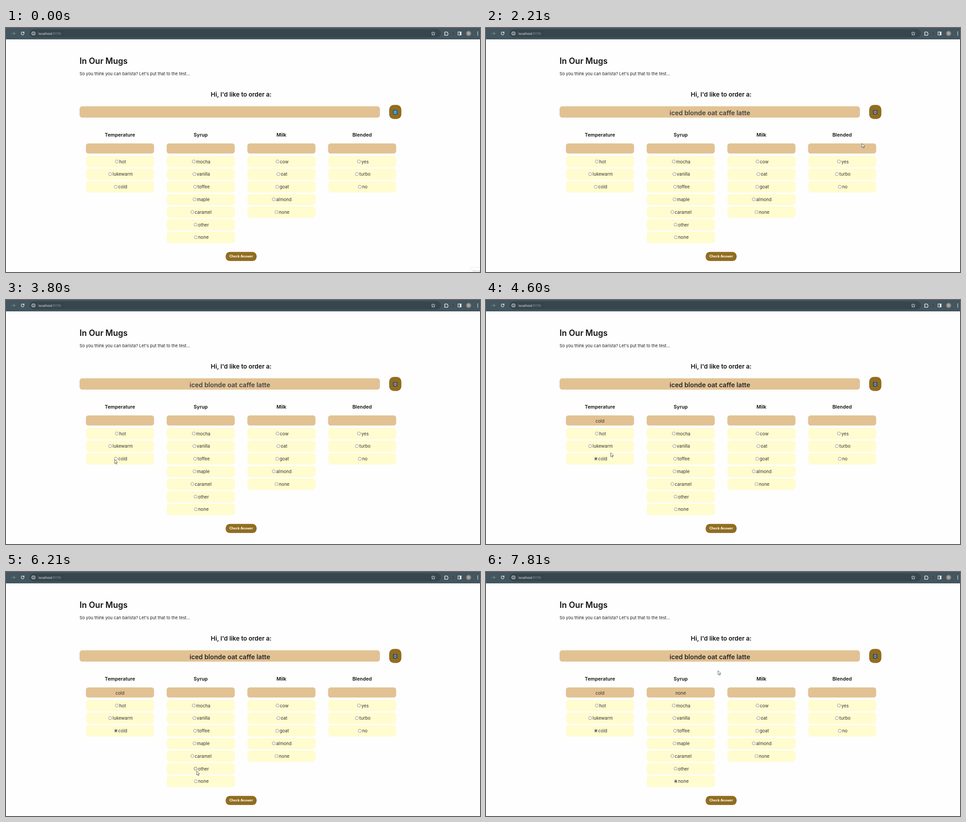
An HTML page for the animation above (8000 ms loop, 1044x537 px).

```html
<!DOCTYPE html>
<html lang="en">
<head>
<meta charset="utf-8">
<title>Barista quiz</title>
<style>
  html, body { margin: 0; width: 100%; height: 100%; overflow: hidden; background: #fefefe; }
  svg { display: block; width: 1044px; height: 537px; font-family: Inter, sans-serif; }
  .mid { text-anchor: middle; }
  .head { font-weight: 600; fill: #111; }
  .label { font-size: 9.75px; fill: #333; }
  .icon { fill: none; stroke: #e4e9eb; stroke-width: 1.2; }
  .ring { fill: #fff; stroke: #777; stroke-width: .8; }
</style>
</head>
<body>
<svg id="stage" viewBox="0 0 1044 537" xmlns="http://www.w3.org/2000/svg">
  <rect width="1044" height="25" fill="#43555e"/>
  <rect x="52" y="2.5" width="906" height="18.5" rx="9.2" fill="#37464d"/>
  <path class="icon" d="M13 12h7M17 9l3 3-3 3" style="stroke:#93a0a6;stroke-width:1"/>
  <path class="icon" d="M39.3 10a3.2 3.2 0 1 0 .6 2.4M39.8 8v2.6h-2.6"/>
  <g class="icon">
    <circle cx="60.5" cy="12" r="3.5"/><path d="M60.5 11.5v2.5M60.5 9.7v1"/>
    <path d="M941 8l1.2 2.7 2.9.3-2.2 2 .7 2.9-2.6-1.6-2.6 1.6.7-2.9-2.2-2 2.9-.3z" style="stroke-width:.9"/>
    <path d="M966 9.3h2a1.3 1.3 0 0 1 2.6 0h2.1v2.2a1.3 1.3 0 0 1 0 2.6v2.1H966v-2a1.4 1.4 0 0 0 0-2.8z"/>
    <path d="M995.7 8.7h6.8v6.8h-6.8z"/>
  </g>
  <path d="M999.5 8.7h3v6.8h-3zM1038 8h2v1.8h-2zM1038 11.2h2v1.8h-2zM1038 14.4h2v1.8h-2z" fill="#e4e9eb"/>
  <path d="M984.5 8v8" stroke="#2f3d44"/>
  <circle cx="1019" cy="12" r="5.5" fill="#8f8c87"/>
  <text class="mid" x="1019" y="14.3" font-size="6" fill="#e8e6e2">B</text>
  <text x="71.3" y="14.5" font-size="7.3" fill="#f1f4f5" style="font-family:'Open Sans',sans-serif">localhost<tspan fill="#a7b1b6">:5173</tspan></text>

  <text class="head" x="162" y="78.5" font-size="18">In Our Mugs</text>
  <text x="162" y="104.4" font-size="9.27" fill="#222">So you think you can barista? Let's put that to the test...</text>
  <text class="mid head" x="518" y="150.7" font-size="13.55">Hi, I'd like to order a:</text>
  <rect x="162" y="172.3" width="661.7" height="25" rx="6" fill="#e2c293"/>
  <text id="order" class="mid" x="493" y="192.4" font-size="14.2" font-weight="600">iced blonde oat caffe latte</text>
  <rect x="844" y="169.3" width="26.8" height="30.9" rx="10" fill="#916d21"/>
  <rect id="refresh" x="852.8" y="181" width="8.8" height="8.8" rx=".8" stroke="#2c4452" stroke-width=".8"/>
  <path d="M855 185.2a2.2 2.2 0 0 1 4-1.2v-1.2M859.5 185.6a2.2 2.2 0 0 1-4 1.2v1.2" fill="none" stroke="#fff" stroke-width="1"/>

  <g id="columns"></g>
  <rect x="483.8" y="492.8" width="68.2" height="20" rx="9" fill="#916d21"/>
  <text class="mid" x="517.9" y="505.4" font-size="7.3" font-weight="700" fill="#fff">Check Answer</text>
  <g id="hint">
    <path d="M1023.5 537v-10H1044" fill="none" stroke="#ececec"/>
    <text x="1027" y="537" font-size="6.5" fill="#c4c4c4">Secur</text>
  </g>
  <path id="cursor" d="M0 0v9l2.1-1.9 1.4 3.2 1.5-.7-1.4-3.1h2.7z" fill="#fff" stroke="#3c4148" stroke-width=".8" stroke-linejoin="round"/>
</svg>
<script>
const LOOP = 8000, STEP = 200;
const ORDERED = 1800, COLD = 4000, NONE = 6800;
const byId = id => document.getElementById(id);

// Each option carries the x of its radio button.
const columns = [
  ["Temperature", "cold", { hot: 244, lukewarm: 229.5, cold: 242 }],
  ["Syrup", "none", { mocha: 413.5, vanilla: 414.8, toffee: 416.5, maple: 415.2, caramel: 410.5, other: 417.5, none: 418 }],
  ["Milk", "", { cow: 598, oat: 599.8, goat: 597.3, almond: 589.8, none: 595.8 }],
  ["Blended", "", { yes: 777.5, turbo: 773, no: 779.3 }]
];

// time, x, y of the pointer tip
const path = [
  [400, 1030, 532], [600, 938, 490], [800, 893, 422], [1000, 805, 315],
  [1200, 754, 262], [1600, 858, 187], [2000, 858, 187], [2200, 828, 254],
  [2600, 640, 310], [3000, 330, 350], [3400, 240, 351], [4400, 238, 351],
  [5400, 421, 275], [5800, 423, 350], [6200, 420, 438], [6600, 417, 459],
  [7000, 417, 459], [7400, 462, 345], [7800, 511, 217]
];

function add(tag, attrs, text = "") {
  const node = document.createElementNS("http://www.w3.org/2000/svg", tag);
  for (const key in attrs) node.setAttribute(key, attrs[key]);
  node.textContent = text;
  return byId("columns").appendChild(node);
}

const picks = {};
let otherRing;
columns.forEach(([title, pick, options], col) => {
  const left = 176 + col * 177.8, mid = left + 75;
  add("text", { class: "mid head", x: mid, y: 239.1, "font-size": 10.8 }, title);
  add("rect", { x: left, y: 254, width: 150, height: 22.3, rx: 5.5, fill: "#e2c293" });
  Object.entries(options).forEach(([name, x], row) => {
    const y = 294 + row * 27.8;
    add("rect", { x: left + .2, y: y - 12.5, width: 150, height: 25, rx: 7, fill: "#fffccf" });
    const ring = add("circle", { class: "ring", cx: x, cy: y - .2, r: 3.4 });
    add("text", { class: "label", x: x + 5.3, y: y + 3.6 }, name);
    if (name === "other") otherRing = ring;
    if (name === pick) picks[title] = [
      add("circle", { cx: x, cy: y - .2, r: 2.1, fill: "#454b55" }),
      add("text", { class: "label mid", x: mid, y: 269.8 }, pick)
    ];
  });
});

const show = (node, on) => { node.style.visibility = on ? "visible" : "hidden"; };

function pointerAt(t) {
  const next = path.findIndex(p => p[0] >= t);
  if (next <= 0) return path[0].slice(1);
  const [t0, x0, y0] = path[next - 1], [t1, x1, y1] = path[next];
  const k = (t - t0) / (t1 - t0);
  return [x0 + (x1 - x0) * k, y0 + (y1 - y0) * k];
}

function draw(now) {
  const t = Math.min(Math.floor((now % LOOP + 10) / STEP) * STEP, LOOP - STEP);
  show(byId("hint"), t < 200);
  show(byId("cursor"), t >= 400);
  byId("cursor").setAttribute("transform", `translate(${pointerAt(t)})`);
  show(byId("order"), t >= ORDERED);
  byId("order").style.fill = t < COLD ? "#434343" : "#252525";
  byId("refresh").style.fill = t < ORDERED ? "#087bd8" : t < COLD ? "#4b555b" : "#2b5270";
  picks.Temperature.forEach(node => show(node, t >= COLD));
  picks.Syrup.forEach(node => show(node, t >= NONE));
  otherRing.style.stroke = t === 6200 ? "#444" : "";
}

const start = performance.now();
function tick() {
  draw(performance.now() - start);
  requestAnimationFrame(tick);
}
tick();
</script>
</body>
</html>
```
